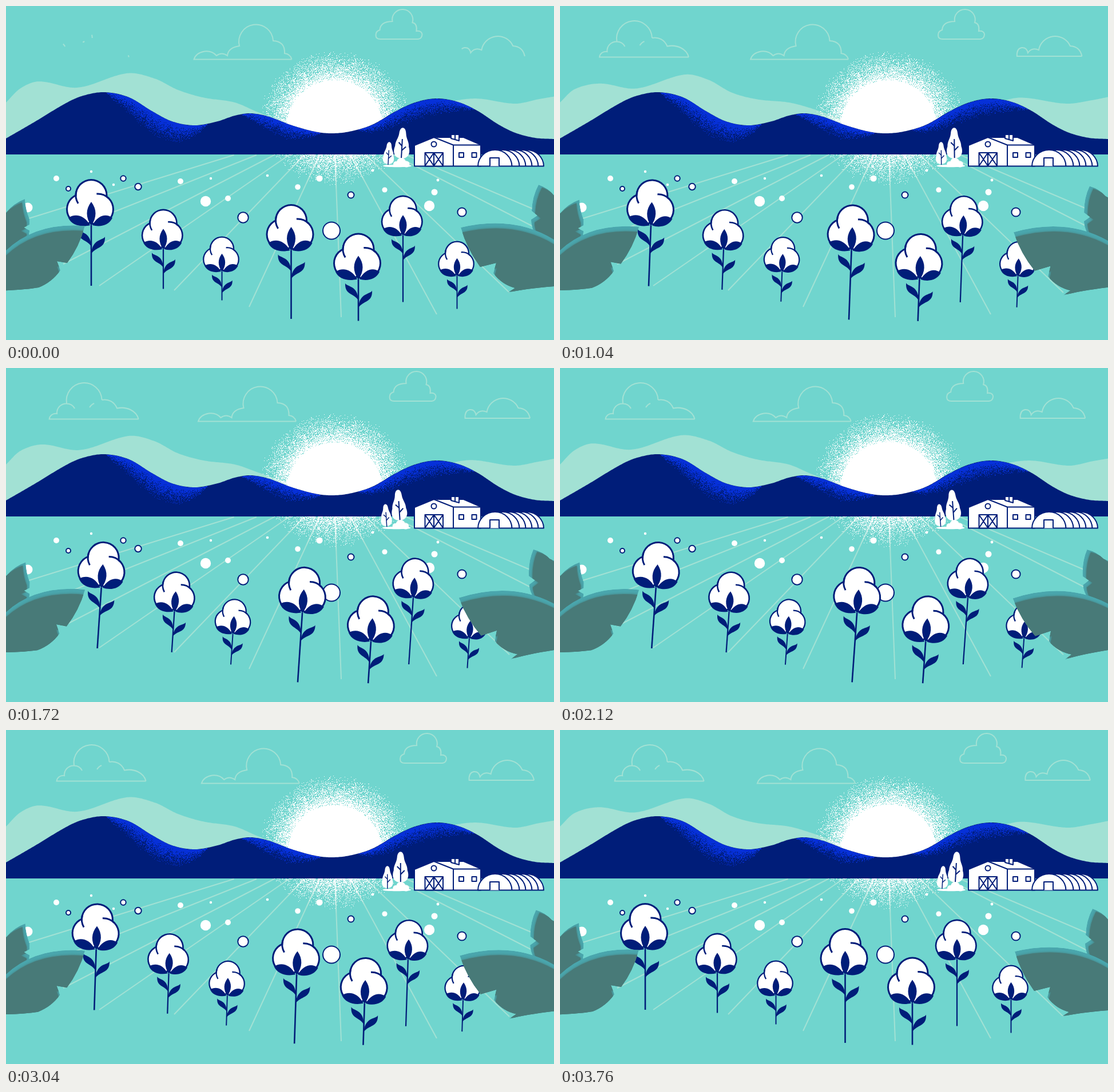
Write an HTML page with a canvas that moves like this. It is 958 px wide and 585 px high and loops after 3.8 s.

```html
<!DOCTYPE html>
<html lang="en">
<head>
<meta charset="utf-8">
<title>Cotton field</title>
<style>
  html, body { margin: 0; width: 100%; height: 100%; overflow: hidden; background: #70d5ce; }
  canvas { display: block; }
</style>
</head>
<body>
<canvas id="stage" width="958" height="585"></canvas>
<script>
const W = 958, H = 585, LOOP = 3800, STEP = 40, HORIZON = 260;
const SKY = '#70d5ce', PALE = '#a2e1d4', NAVY = '#001d79', WHITE = '#fff';
const LEAF = '#487a78', LEAF_EDGE = '#4aa6ad';
const TAU = Math.PI * 2;
const ctx = document.getElementById('stage').getContext('2d');

// ---------- helpers ----------
let seed = 7;
function random() {
  seed = (seed * 1664525 + 1013904223) >>> 0;
  return seed / 4294967296;
}

// Smooth curve through a flat list of x, y pairs.
function spline(pts, x) {
  const n = pts.length / 2, px = i => pts[2 * i], py = i => pts[2 * i + 1];
  let i = 0;
  while (i < n - 2 && x > px(i + 1)) i++;
  const slope = j => {
    const a = Math.max(j - 1, 0), b = Math.min(j + 1, n - 1);
    return (py(b) - py(a)) / (px(b) - px(a));
  };
  const h = px(i + 1) - px(i), u = (x - px(i)) / h, v = 1 - u;
  return v * v * (1 + 2 * u) * py(i) + u * v * v * h * slope(i)
    + u * u * (3 - 2 * u) * py(i + 1) - u * u * v * h * slope(i + 1);
}

function ease(u) {
  u = Math.min(1, Math.max(0, u));
  return u * u * (3 - 2 * u);
}

function disc(c, x, y, r, color) {
  c.fillStyle = color;
  c.beginPath();
  c.arc(x, y, r, 0, TAU);
  c.fill();
}

function line(c, ...p) {
  c.beginPath();
  for (let i = 0; i < p.length; i += 2) c.lineTo(p[i], p[i + 1]);
  c.stroke();
}

function fillBelow(c, pts, x0, x1, color) {
  c.fillStyle = color;
  c.beginPath();
  c.moveTo(x0, HORIZON);
  for (let x = x0; x <= x1; x += 2) c.lineTo(x, spline(pts, x));
  c.lineTo(x1, HORIZON);
  c.fill();
}

function layer(paint) {
  const c = document.createElement('canvas');
  c.width = W;
  c.height = H;
  paint(c.getContext('2d'));
  return c;
}

function posed(x, y, angle, scale, paint) {
  ctx.save();
  ctx.translate(x, y);
  ctx.rotate(angle);
  ctx.scale(scale, scale);
  paint();
  ctx.restore();
}

// ---------- motion ----------
const SWAY = [-40, 0, 0, 0, 220, .025, 680, .265, 1400, .77, 1940, 1, 2120, .98, 2640, .735,
  3040, .455, 3400, .17, 3620, .03, 3760, 0, 3800, 0];
const SUN_RADIUS = [0, 84.5, 680, 86, 1400, 83, 2120, 85, 2640, 84, 3040, 82.5, 3800, 83.8];

// ---------- still layers ----------
const RIDGE = [0, 232, 50, 203, 105, 170, 135, 157, 173, 151, 215, 160, 255, 184, 290, 202, 330, 209,
  370, 202, 400, 192, 428, 188, 460, 194, 500, 209, 540, 220, 568, 223, 600, 220, 640, 208,
  680, 185, 715, 169, 752, 162, 790, 168, 825, 184, 860, 207, 890, 222, 925, 231, 958, 233];

const glow = layer(c => {
  c.fillStyle = WHITE;
  for (let y = 75; y < 316; y++) {
    for (let x = 440; x < 712; x++) {
      const d = Math.hypot((x - 575) / 134, (y - 196) / 120);
      const density = Math.min(1, Math.max(0, (1 - d) / .42)) ** 1.4;
      if (random() < density * (y > HORIZON ? .62 : .85)) c.fillRect(x, y, 1, 1);
    }
  }
});

// Grainy light on a slope between two x positions.
function shadeSlope(c, x0, x1, depth) {
  c.fillStyle = '#0630d8';
  for (let x = x0; x < x1; x++) {
    const top = spline(RIDGE, x);
    const reach = depth * Math.sin(Math.PI * (x - x0) / (x1 - x0)) ** .8;
    for (let d = 0; d < reach; d++) {
      if (random() < 1.15 * (1 - d / reach) ** 1.2) c.fillRect(x, Math.ceil(top + d), 1, 1);
    }
  }
}

function barn(c) {
  c.strokeStyle = NAVY;
  c.fillStyle = WHITE;
  c.lineWidth = 2;
  c.lineJoin = 'round';
  const shape = d => {
    const p = new Path2D(d);
    c.fill(p);
    c.stroke(p);
  };
  shape('M714 280.5V244L748 230H800L830 243V280.5Z');
  shape('M748 230L782 243.500H830M782 243.500V280.500');
  shape('M778 225H792V236L785 234L778 232ZM785 225V235M776 224H794');
  shape('M732.500 257H764V280.500H732.500ZM748 257V280M732.500 257L748 280L764 257M732.500 280L748 257L764 280');
  shape('M792 257H800V265H792ZM814.500 257H822.500V265H814.500Z');
  shape('M743.500 242A4.500 4.500 0 1 0 752.500 242A4.500 4.500 0 1 0 743.500 242');
  shape('M825 280.500A30 29 0 0 1 855 252H911A30 29 0 0 1 940 280.500Z');
  c.beginPath();
  for (const x of [855, 868, 879, 890, 901]) {
    c.moveTo(x, 252);
    c.ellipse(x, 281, 29.5, 29, 0, -Math.PI / 2, 0);
  }
  c.stroke();
  shape('M846 280.500V266H862V280.500');
}

const WHITE_DOTS = [88, 302, 5, 149, 290, 2.2, 188, 313, 2.2, 305, 307, 5, 358, 302, 2.2, 349, 342, 9.2,
  388, 337, 5, 457, 297, 2.3, 510, 317, 4.8, 548, 302, 5.6, 641, 288, 2.4, 662, 322, 4.6,
  740, 350, 9.2, 749, 326, 5.5, 755, 305, 2.4, 38, 353, 8.5];
const RINGED_DOTS = [109, 320, 5, 205, 302, 5.7, 231, 316.5, 6.7, 414.5, 370.5, 10.2,
  569, 393.5, 16, 603, 331, 6.5, 797, 361, 8.6];

const land = layer(c => {
  fillBelow(c, RIDGE, 0, W, NAVY);
  shadeSlope(c, 175, 352, 42);
  shadeSlope(c, 412, 550, 28);
  shadeSlope(c, 615, 818, 33);
  barn(c);
  for (let i = 0; i < WHITE_DOTS.length; i += 3) {
    disc(c, WHITE_DOTS[i], WHITE_DOTS[i + 1], WHITE_DOTS[i + 2], WHITE);
  }
  for (let i = 0; i < RINGED_DOTS.length; i += 3) {
    const [x, y, r] = RINGED_DOTS.slice(i, i + 3);
    disc(c, x, y, r, NAVY);
    disc(c, x, y, r - 2, WHITE);
  }
});

// ---------- sky ----------
// Each cloud: outline, its length, drift in px/s, time (s) at which the outline sits as written, start of drawing (s).
const CLOUDS = [
  { d: 'M228.500 89.500C225 75 208 67 191 70.500C186 59 176 54 164.500 56M151 62Q146 64 143 69',
    length: 85, speed: 9.8, at: 1.4, start: -.12 },
  { d: 'M164.500 56A31 31 0 1 0 103 62.500A16 16 0 0 0 86 80C78 79 73 84 72.500 89.500H228.500M117 71A16 16 0 0 0 103 62.500',
    length: 310, speed: 9.8, at: 1.4, start: -.08 },
  { d: 'M502.500 93.500Q500 84 490 83Q491 62 470 61A30 30 0 1 0 411 70Q391 73 390 87Q380 80 371 87Q363 78 350 79.500Q335 82 331.500 93.500H502.500',
    length: 448, speed: 4.35, at: .68, start: -.86 },
  { d: 'M737 49Q735 43 727 44Q729 31 720 29A18 18 0 1 0 685 27Q664 27 663 42Q656 44 656 51Q656 58 664 58H730Q737 57 737 49',
    length: 237, speed: 14, at: .68, start: -.88 },
  { d: 'M910.500 88Q907 71 890 70A29 29 0 0 0 835 77Q823 72 816 82Q814 72 805 73Q796 75 797 88H910.500',
    length: 275, speed: 5.35, at: .68, start: -.52 }
].map(c => ({ ...c, path: new Path2D(c.d) }));

function drawClouds(sec) {
  ctx.strokeStyle = PALE;
  ctx.lineWidth = 2;
  for (const c of CLOUDS) {
    const shown = ease(sec - c.start);
    ctx.save();
    ctx.translate(c.speed * (sec - c.at), 0);
    if (shown < 1) ctx.setLineDash([shown * c.length, 999]);
    ctx.stroke(c.path);
    ctx.restore();
  }
}

function drawFarHills(t) {
  const k = Math.cos(TAU * (t - 1060) / 3040);
  fillBelow(ctx, [0, 169, 25, 145 + k, 62 + 8 * k, 133.5 + 2.3 * k, 128 + 5 * k, 143.5 + k,
    214 + 4 * k, 118.7 + 1.4 * k, 260, 128 + 1.5 * k, 300, 148.5 + 3 * k, 345, 161.5 + 2 * k,
    400, 169, 440, 183.5 - 4 * k, 492, 202 - 4 * k], 0, 492, PALE);
  fillBelow(ctx, [760, 170, 815 - 10 * k, 161.5 - k, 888 - 3 * k, 171,
    930, 164 + k, 960, 158.5 + .5 * k], 760, W, PALE);
}

function drawSun(t) {
  const tint = ctx.createRadialGradient(573, 207, 55, 573, 207, 115);
  tint.addColorStop(0, WHITE);
  tint.addColorStop(1, PALE);
  ctx.strokeStyle = tint;
  ctx.lineWidth = 2;
  const ends = [40, 372, 40, 420, 100, 452, 163, 490, 294, 498, 425, 527,
    586, 545, 753, 540, 880, 502, 925, 388, 925, 357];
  for (let i = 0; i < ends.length; i += 2) {
    const x = ends[i], y = ends[i + 1];
    line(ctx, 573 + (x - 573) * 54 / (y - 207), 261, x, y);
  }
  ctx.drawImage(glow, 0, 0);
  ctx.save();
  ctx.beginPath();
  ctx.rect(0, 0, W, 245);
  ctx.clip();
  disc(ctx, 575, 214, spline(SUN_RADIUS, t), WHITE);
  ctx.restore();
}

// ---------- plants ----------
const CROWN = new Path2D('M0 0C-12 0-16-10-12-21C-12-31-7-34-6-44C-5-57 5-57 6-44C7-34 12-31 12-21C16-10 12 0 0 0');

function drawTrees(sway) {
  const tilt = .055 - .13 * sway;
  const tree = (x, y, scale) => posed(x - 2.5 * sway, y, tilt, scale, () => {
    ctx.fillStyle = WHITE;
    ctx.fill(CROWN);
    ctx.strokeStyle = NAVY;
    ctx.lineWidth = 2;
    line(ctx, 0, 3, 0, -34);
    line(ctx, 0, -14, 7, -21);
    line(ctx, 0, -22, -6, -28);
  });
  tree(668, 277, .72);
  tree(691, 267, 1);
  const x = 691 - 1.5 * sway;
  for (const [dx, y, r] of [[-9, 277, 5], [0, 274, 8], [9, 277, 5.5]]) disc(ctx, x + dx, y, r, WHITE);
  ctx.beginPath();
  ctx.ellipse(x - 7, 280, 25, 2.3, 0, 0, TAU);
  ctx.fill();
}

const SEPALS = new Path2D('M-40-13C-28-21-12-18-2 0C-18 4-34 0-40-13M37-13C26-21 12-18 2 0C16 4 31 0 37-13M0-41C-10-28-10-14 0 1C10-14 10-28 0-41');
const STEM_LEAVES = new Path2D('M-23 7C-20 14-1 10 0 37C-8 24-24 28-23 7M24 20C21 27 2 23 0 50C9 37 25 41 24 20');
const BOLL = [[0, -52.5, 27], [-15.5, -28, 27], [11.5, -28, 27]];

// x, head bottom, stem bottom, scale, shift of the stem foot
const FLOWERS = [
  [149, 384, 490, 1, 11.5, .5], [275, 426, 495.5, .87, 16, 2], [377.5, 465, 515.5, .76, 17, 3.5],
  [498.5, 428, 548, 1, 12.5, 2], [616, 478.5, 551.5, 1, 18.5, 0], [694, 402, 518.5, .87, 11, 0],
  [788.5, 473, 530.5, .76, 19, -6]
];

function drawFlower([x, top, foot, scale, dx, dy], sway) {
  const tilt = .072 * sway, length = foot - top;
  posed(x + dx * sway + tilt * length, top + .8 * sway, tilt, scale, () => {
    ctx.strokeStyle = NAVY;
    ctx.lineWidth = 2.6;
    line(ctx, 0, 0, 0, (length + dy * sway) / scale);
    for (const [cx, cy, r] of BOLL) disc(ctx, cx, cy, r + 1.5, NAVY);
    for (const [cx, cy, r] of BOLL) disc(ctx, cx, cy, r - 1.5, WHITE);
    ctx.lineWidth = 3;
    ctx.beginPath();
    ctx.arc(0, -52.5, 27, 2.58, 3.4);
    ctx.stroke();
    ctx.beginPath();
    ctx.arc(11.5, -28, 27, -1.65, -.8);
    ctx.stroke();
    ctx.fillStyle = NAVY;
    ctx.fill(SEPALS);
    ctx.fill(STEM_LEAVES);
  });
}

// Corner leaves: outline, pivot, turn, offset of the dark part.
const LEAVES = [
  { d: 'M-30 385L0 362Q14 345 33 338Q34 356 41 373L41 383L31 388L41 393Q42 404 28 420L-30 450Z',
    pivot: [0, 400], turn: .025, drop: 1.5, inset: [-5, 6] },
  { d: 'M-30 450L0 428Q52 378 138 385Q128 422 107 450L89 447L95 463Q80 484 57 493Q28 498-30 499Z',
    pivot: [0, 400], turn: .025, drop: 0, inset: [0, 9] },
  { d: 'M990 350L958 332Q948 319 931 313Q920 333 919 359L929 367L918 374Q918 393 932 408L990 430Z',
    pivot: [979, 417], turn: -.096, drop: 0, inset: [6, 5] },
  { d: 'M1010 440L958 409Q888 366 795 388Q806 426 829 457L857 450L852 468Q867 488 890 494L877 502Q920 492 1010 488Z',
    pivot: [990, 440], turn: -.08, drop: 0, inset: [1, 9] }
].map(l => ({ ...l, path: new Path2D(l.d) }));

function drawLeaf({ path, pivot: [px, py], turn, drop, inset }, sway) {
  posed(px, py + drop * sway, turn * sway, 1, () => {
    ctx.translate(-px, -py);
    ctx.clip(path);
    ctx.fillStyle = LEAF_EDGE;
    ctx.fill(path);
    ctx.translate(...inset);
    ctx.fillStyle = ctx.shadowColor = LEAF;
    ctx.shadowBlur = 4;
    ctx.fill(path);
  });
}

// ---------- loop ----------
function draw(t) {
  const sway = spline(SWAY, t);
  ctx.fillStyle = SKY;
  ctx.fillRect(0, 0, W, H);
  drawClouds(t / 1000);
  drawFarHills(t);
  drawSun(t);
  ctx.drawImage(land, 0, 0);
  drawTrees(sway);
  for (const f of FLOWERS) drawFlower(f, sway);
  for (const l of LEAVES) drawLeaf(l, sway);
}

const begin = performance.now();
function tick() {
  const t = (performance.now() - begin) % LOOP;
  draw(Math.floor(t / STEP) * STEP);
  requestAnimationFrame(tick);
}
tick();
</script>
</body>
</html>
```
